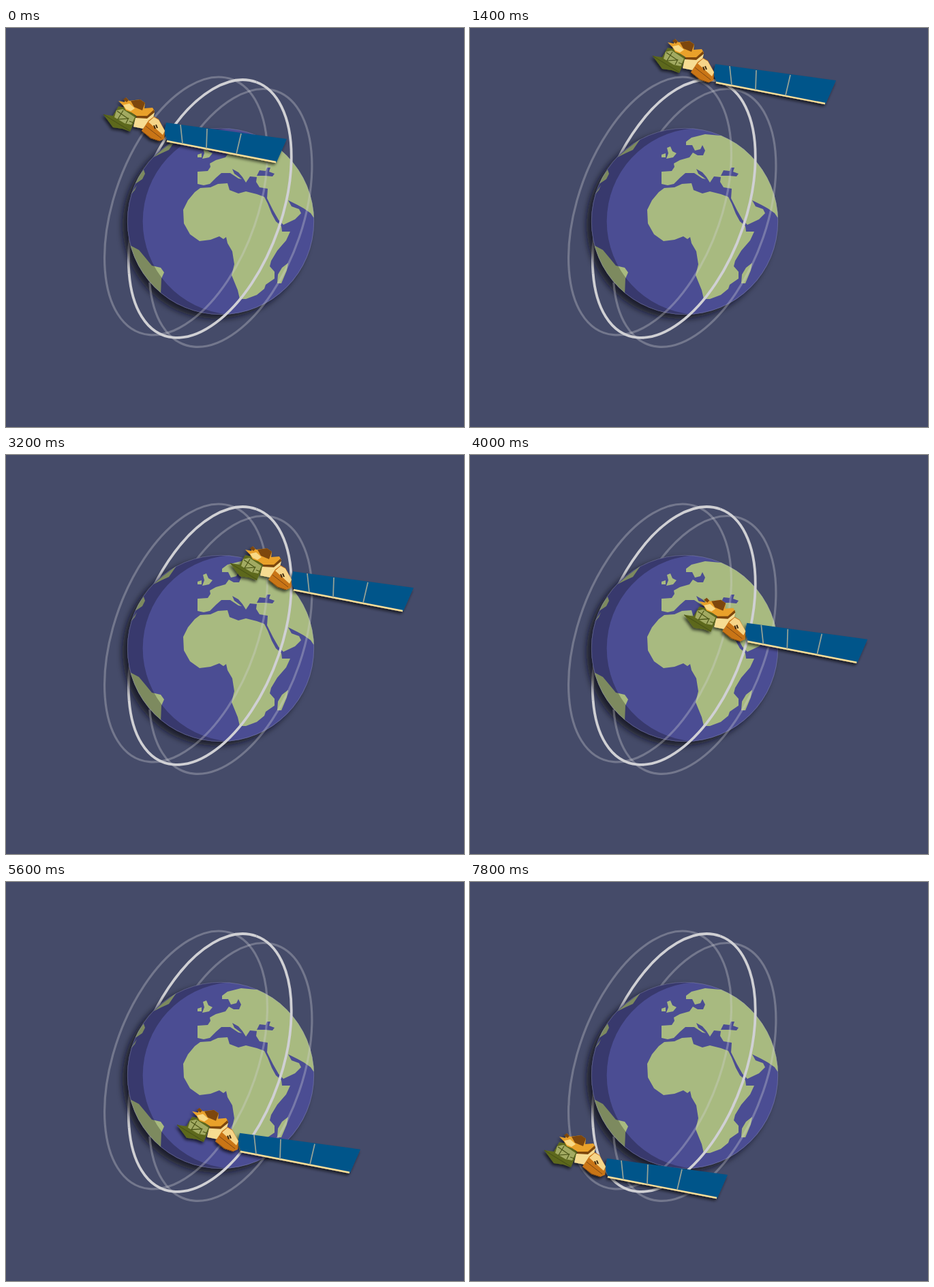
Animation of 672x586 px, one loop 8 s. Source, as an HTML page:

```html
<!DOCTYPE html>
<html lang="en">
<head>
<meta charset="utf-8">
<title>Satellite in orbit</title>
<style>
html, body { margin: 0; width: 100%; height: 100%; overflow: hidden; background: #454b69; }
svg { display: block; width: 100%; height: 100%; }
.orbit { fill: none; stroke: #d0d0d4; stroke-width: 3.8; }
.dim { stroke-width: 3.2; opacity: .33; }
.land { fill: #a8ba80; }
.sea { fill: #4b4d93; }
</style>
</head>
<body>
<svg viewBox="0 0 672 586">
  <defs>
    <filter id="globeShadow" x="-20%" y="-20%" width="140%" height="140%">
      <feDropShadow dx="-7" dy="6" stdDeviation="5" flood-color="#0b0d1c" flood-opacity=".8"/>
    </filter>
    <filter id="craftShadow" x="-10%" y="-20%" width="120%" height="150%">
      <feDropShadow dx="-2" dy="3" stdDeviation="2" flood-color="#000" flood-opacity=".65"/>
    </filter>
    <clipPath id="disc"><circle cx="315" cy="284" r="137"/></clipPath>
    <path id="back" d="M-79 129.6A104.5 198 0 0 1 0-198"/>
    <path id="front" d="M-79 129.6A104.5 198 0 1 0 0-198"/>
  </defs>
  <rect width="672" height="586" fill="#454b69"/>
  <g id="backOrbits"></g>

  <circle class="sea" cx="315" cy="284" r="137" filter="url(#globeShadow)"/>
  <g clip-path="url(#disc)">
    <g class="land">
      <!-- Africa and Madagascar -->
      <path d="M285 235L300 234 311 229 325 228 328 238 341 243 352 240 368 244 379 248 384 258 390 273 396 284 404 291 405 299 417 299 411 312 398 327 389 342 387 350 394 358 394 368 381 377 379 383 368 392 352 398 343 398 340 385 331 363 335 347 332 328 325 316 323 307 319 310 313 306 300 311 284 313 270 303 261 287 260 267 267 253 277 241Z"/>
      <path d="M414 345L412 356 404 375 398 375 399 362 405 352Z"/>
      <!-- Europe and Asia -->
      <path d="M281 229L281 211 296 210 300 204 299 199 308 194 322 190 327 183 334 187 342 187 345 180 341 172 338 178 330 180 326 172 317 172 317 167 325 161 345 156 367 158 400 150 465 220 465 285 451 278 447 272 437 265 428 260 414 253 419 262 430 266 433 272 424 281 407 289 400 282 392 268 383 250 384 236 372 234 367 226 368 219 358 218 352 227 347 219 341 212 332 207 335 214 346 222 341 221 329 213 316 213 308 220 299 229 290 231Z"/>
      <!-- British Isles -->
      <path d="M289 176L294 174 297 181 303 184 298 190 288 192 291 184ZM281 186L287 184 287 190 281 190Z"/>
      <!-- Americas and Greenland -->
      <path d="M176 316L195 326 205 338 214 349 227 352 232 359 228 368 227 392 190 380ZM216 190L230 178 250 163 239 179 228 184ZM186 229L202 208 204 214 200 222 191 228ZM182 246L192 231 189 238Z"/>
    </g>
    <path class="sea" d="M368 217L372 209 381 210 383 205 388 205 386 211 394 214 391 218 380 217Z"/>
    <path d="M170 140H326A137 137 0 0 0 326 421H170Z" fill="#000" opacity=".26" id="shade"/>
  </g>
  <circle cx="315" cy="284" r="136.7" fill="none" stroke="#9a9db5" stroke-width=".7" opacity=".5"/>
  <g id="frontOrbits"></g>

  <g id="craft">
    <g filter="url(#craftShadow)">
      <path fill="#04558a" d="M235 139L412 163 397 197 237 166 232 153Z"/>
      <path fill="none" stroke="#f8dd98" stroke-width="2.4" d="M236 166L396 197"/>
      <path fill="none" stroke="#98a396" stroke-width="1.7" d="M256 142L259 170M295 148L294 177M345 155L338 185"/>
      <!-- instrument box -->
      <path fill="#5d681c" d="M143 127L157 129 165 115 178 118 191 130 186 143 182 152 171 148 157 146Z"/>
      <path fill="#a2aa62" d="M162 121L171 119 189 131 184 142 174 140 159 131Z"/>
      <path fill="none" stroke="#4b5518" stroke-width="1.2" d="M143 127L182 151M163 122L179 133 164 134 172 121M180 132L176 140M181 137L187 139"/>
      <!-- gold body -->
      <path fill="#e9a12b" d="M165 107L174 109 176 102 181 107 197 105 204 110 203 118 215 117 218 122 208 131 196 132 184 124 176 121 172 114Z"/>
      <path fill="#7d4710" d="M183 107L197 105 204 110 200 121 188 116ZM172 105L176 102 180 106 177 109ZM191 129L207 129 217 120 218 124 208 133 192 133Z"/>
      <path fill="#f8d985" d="M172 113L181 111 189 118 183 122 176 119Z"/>
      <path fill="#f6dc92" d="M190 132L207 133 218 124 216 132 208 140 202 148 187 145Z"/>
      <!-- service module -->
      <path fill="#c97419" d="M199 151L209 136 217 130 224 134 233 151 232 163 225 166 212 162Z"/>
      <path fill="#f6d588" d="M209 138L217 131 224 135 233 151 230 157Z"/>
      <path fill="none" stroke="#7d4710" stroke-width="1" d="M200 152L213 162 225 166M205 144L228 162"/>
      <path fill="none" stroke="#3b2508" stroke-width="2" d="M217 143L219 148M220 142L222 147"/>
    </g>
  </g>
</svg>
<script>
const STEP = 200, LOOP = 8000;
const $ = id => document.getElementById(id);

// Three copies of one tilted ellipse: centre x, centre y, class
const orbits = [[264, 261.5, 'orbit dim'], [329.5, 279, 'orbit dim'], [299.3, 265.5, 'orbit']];
for (const side of ['back', 'front']) {
  $(side + 'Orbits').innerHTML = orbits.map(([x, y, cls]) =>
    `<use href="#${side}" class="${cls}" transform="translate(${x} ${y}) rotate(20.1)"/>`).join('');
}

// Night side: the disc minus the same disc moved to the right
$('shade').setAttribute('d',
  'M170 140H326V147.5A137 137 0 0 0 326 420.5V430H170Z');

// Flight path: time, x offset, y offset
const path = [
  [0, 0, 0], [600, 31, -42], [900, 55, -67], [1200, 85, -82], [1400, 125, -86],
  [1800, 145, -77], [2200, 161, -63], [2400, 170, -47], [2800, 181, -9],
  [3200, 186, 32], [3600, 180, 75], [4200, 167, 124], [4800, 149, 170],
  [5400, 119, 216], [6000, 86, 257], [6400, 57, 280], [6800, 20, 289],
  [7200, -16, 284], [7800, -34, 267]
];

function offsetAt(t) {
  const i = Math.max(1, path.findIndex(p => p[0] >= t));
  const [t0, x0, y0] = path[i - 1], [t1, x1, y1] = path[i];
  const k = (t - t0) / (t1 - t0);
  return [x0 + (x1 - x0) * k, y0 + (y1 - y0) * k];
}

function draw(ms) {
  const t = Math.floor(ms % LOOP / STEP) * STEP;
  const [x, y] = offsetAt(t);
  $('craft').setAttribute('transform', `translate(${x.toFixed(1)} ${y.toFixed(1)})`);
}

const start = performance.now();
function tick() {
  draw(performance.now() - start);
  requestAnimationFrame(tick);
}
tick();
</script>
</body>
</html>
```
